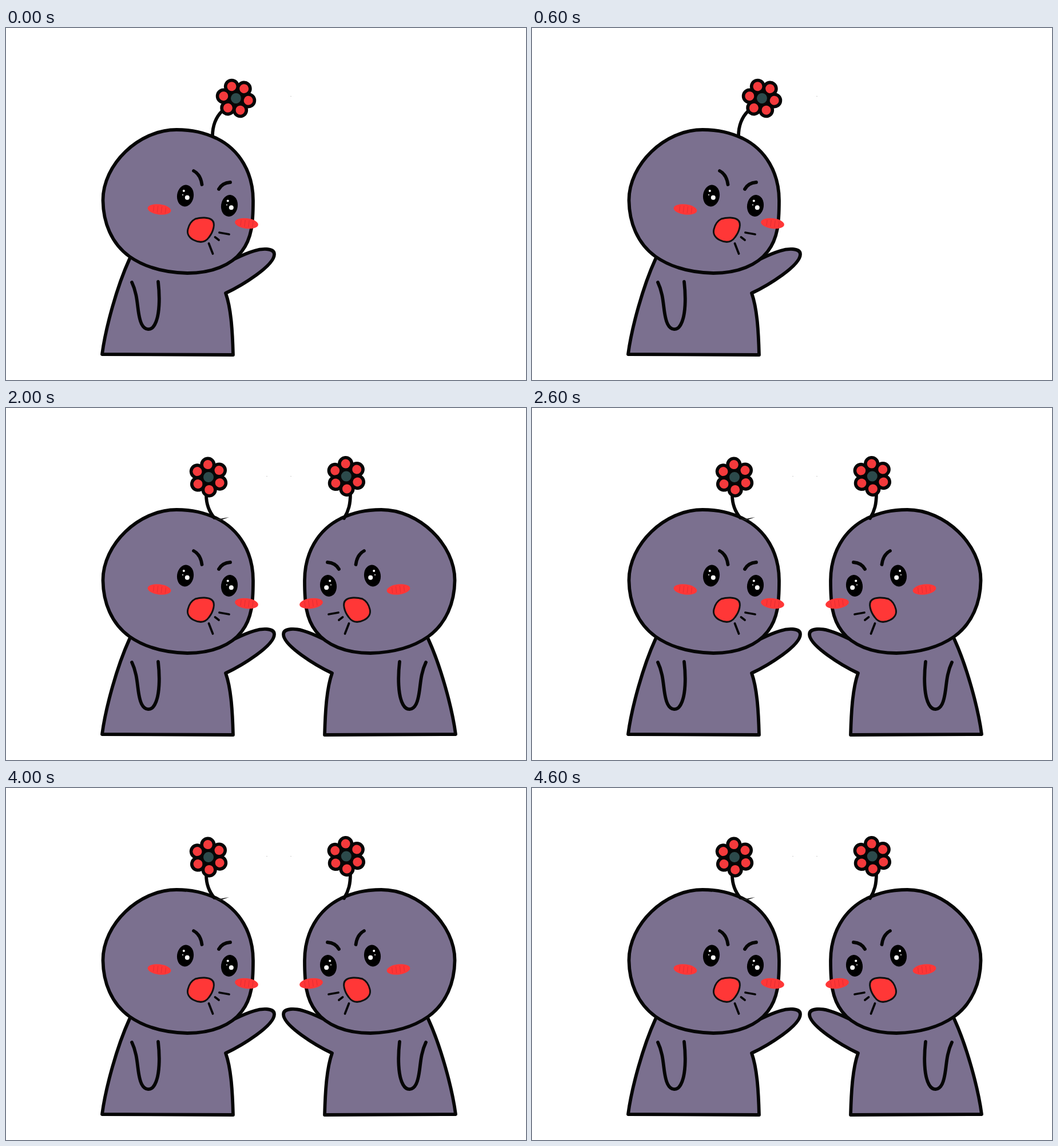
Write an HTML page that moves like this. It is 909 by 616 pixels and loops after 5 s.

```html
<!DOCTYPE html>
<html lang="en">
<head>
<meta charset="utf-8">
<title>Quarrel</title>
<style>
  html, body { margin: 0; height: 100%; overflow: hidden; background: #fff; }
  svg { display: block; width: 100vw; height: 100vh; }
  .line { fill: none; stroke: #060606; stroke-width: 5.8; stroke-linecap: round; stroke-linejoin: round; }
  .line.skin { fill: #7b708f; }
  .line.thin { stroke-width: 3.8; }
  .red { fill: #ff3737; }
</style>
</head>
<body>
<svg viewBox="0 0 909 616">
  <defs>
    <g id="petal">
      <circle cy="-22" r="10.8" fill="#f43a3c" stroke="#060606" stroke-width="5.6"/>
    </g>
    <g id="flower">
      <circle r="20" fill="#060606"/>
      <use href="#petal"/>
      <use href="#petal" transform="rotate(60)"/>
      <use href="#petal" transform="rotate(120)"/>
      <use href="#petal" transform="rotate(180)"/>
      <use href="#petal" transform="rotate(240)"/>
      <use href="#petal" transform="rotate(300)"/>
      <circle r="11" fill="#2c4a4b" stroke="#060606" stroke-width="4"/>
    </g>
    <g id="bent">
      <path class="line" d="M361 189C361 170 368 155 378 145"/>
      <use href="#flower" transform="translate(402 123) rotate(-20)"/>
    </g>
    <g id="eye">
      <ellipse rx="14.5" ry="19" transform="rotate(8)" fill="#000"/>
      <g fill="#fff">
        <circle cx="3.3" cy="3.3" r="4"/>
        <circle cx="-2.7" cy="-8.5" r="2"/>
        <circle cx="-4.5" cy="-1.5" r="1"/>
      </g>
    </g>
    <g id="blush" transform="rotate(7)">
      <ellipse rx="20.5" ry="9" class="red"/>
      <path d="M-10-5V5M-3-6V6M4-6V6M11-5V5" stroke="#e93034" stroke-width="1.5"/>
    </g>
    <g id="figure">
      <path class="line skin" d="M216 404C194 452 174 525 168 571L397 572C396 535 394 492 384 464C412 451 469 416 469 396C469 384 446 386 434 390C424 393 412 398 400 404"/>
      <path class="line skin" d="M169.5 302C169 239 232 178 298 178C326 178 346 183 368 193C409 213 432 254 432 302C432 340 430 368 412 391C394 415 360 429 317 429C277 428 243 419 216 400C184 377 170 340 169.5 302Z"/>
      <path class="line" d="M220 445C233 472 228 500 237 518C243 530 254 530 260 519C269 503 269 470 266 444"/>
      <path class="line" d="M328 250Q340 256 342.5 274M372 282Q378 271 392 270"/>
      <use href="#eye" x="313.5" y="293.5"/>
      <use href="#eye" x="390.5" y="311"/>
      <use href="#blush" x="268" y="317.5"/>
      <use href="#blush" x="420.5" y="342"/>
      <path class="red" stroke="#111" stroke-width="3" d="M331 334C341 331 354 331 360 336C367 342 362 357 355 366C348 376 338 376 328 371C320 367 316 360 318 352C320 344 325 337 331 334Z"/>
      <path class="line thin" d="M373 358L390 361M365.5 366L372 371M354.5 377L361.5 395"/>
      <circle cx="498" cy="119.5" r=".6" fill="#999"/>
    </g>
  </defs>

  <!-- data-at lists the seconds of the loop in which a part is visible -->
  <use href="#figure" data-at="0234"/>
  <use href="#bent" data-at="03"/>
  <g data-at="24">
    <path class="line" d="M350 152C350 168 354 180 364 192"/>
    <path d="M364 194L376 193.500L390 191L375 196.500Z" fill="#222"/>
    <use href="#flower" transform="translate(354 121) rotate(-3)"/>
  </g>

  <g transform="translate(954) scale(-1 1)">
    <use href="#figure" data-at="1234"/>
    <use href="#bent" data-at="3"/>
  </g>
  <g data-at="124">
    <path class="line" d="M602 150C602 168 599 180 591 193"/>
    <use href="#flower" transform="translate(594.8 119.5) rotate(-3)"/>
  </g>
</svg>
<script>
  const parts = document.querySelectorAll('[data-at]');
  const start = performance.now();

  function draw() {
    const second = Math.floor((performance.now() - start) / 1000) % 5;
    for (const part of parts) {
      part.style.display = part.dataset.at.includes(second) ? '' : 'none';
    }
    requestAnimationFrame(draw);
  }
  draw();
</script>
</body>
</html>
```
